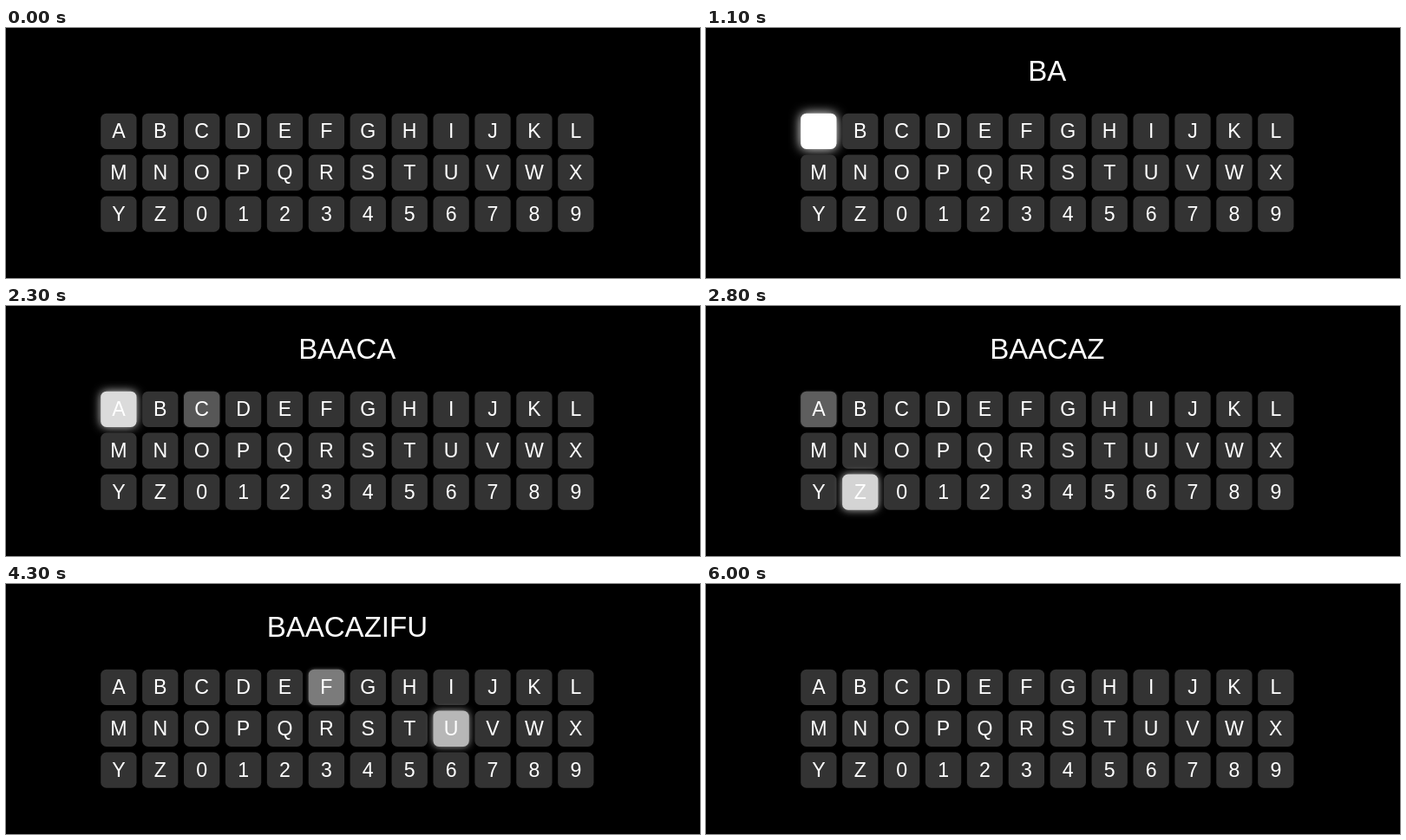
Recreate the animation shown at these times as an HTML page. Size 800x289 px, loop 6.2 s.

```html
<!DOCTYPE html>
<html lang="en">
<head>
<meta charset="utf-8">
<title>Typing keyboard</title>
<style>
  html, body { margin: 0; width: 100%; height: 100%; overflow: hidden; background: #000; }
  #stage {
    position: absolute; left: 0; top: 0; width: 688px;
    transform: translate(109.2px, 32.6px) scale(.826); transform-origin: 0 0;
    font-family: "Liberation Sans", Arial, sans-serif; color: #fff; text-align: center;
  }
  #word { height: 40px; margin-bottom: 40px; font-size: 40px; line-height: 40px; }
  #keys { display: grid; grid-template-columns: repeat(12, 50px); gap: 8px; }
  .key { height: 50px; border-radius: 8px; background: #333; font-size: 28px; line-height: 50px; }
</style>
</head>
<body>
<div id="stage">
  <div id="word"></div>
  <div id="keys"></div>
</div>
<script>
const WORD = "BAACAZIFUZ";
const LOOP = 6200, TICK = 100;
const START = 99, INTERVAL = 511, FADE = 300;
const CLEAR = START + (WORD.length - 1) * INTERVAL + 1000;

const wordBox = document.getElementById("word");
const keys = [..."ABCDEFGHIJKLMNOPQRSTUVWXYZ0123456789"].map(char => {
  const box = document.createElement("div");
  box.className = "key";
  box.textContent = char;
  document.getElementById("keys").append(box);
  return { char, box };
});

// CSS "ease": cubic-bezier(.25, .1, .25, 1), solved by bisection.
function ease(x) {
  if (x <= 0) return 0;
  if (x >= 1) return 1;
  const bezier = (a, b, s) => 3 * a * s * (1 - s) ** 2 + 3 * b * s * s * (1 - s) + s ** 3;
  let low = 0, high = 1;
  for (let i = 0; i < 24; i++) {
    const mid = (low + high) / 2;
    if (bezier(.25, .25, mid) < x) low = mid; else high = mid;
  }
  return bezier(.1, 1, low);
}

function light(box, level) {
  const shade = Math.round(51 + 204 * level);
  box.style.background = `rgb(${shade}, ${shade}, ${shade})`;
  box.style.boxShadow = level ? `0 0 ${15 * level}px rgba(255, 255, 255, ${level})` : "none";
}

function draw(time) {
  const cleared = time >= CLEAR;
  const index = cleared ? WORD.length : Math.min(WORD.length - 1, Math.floor((time - START) / INTERVAL));
  const pressedAt = cleared ? CLEAR : START + index * INTERVAL;
  const blend = ease((time - pressedAt) / FADE);
  const current = WORD[index], previous = WORD[index - 1];

  wordBox.textContent = cleared ? "" : WORD.slice(0, index + 1);
  for (const { char, box } of keys) {
    light(box, (char === current ? blend : 0) + (char === previous ? 1 - blend : 0));
  }
}

// The picture advances in steps of one tick.
function frame() {
  draw(Math.floor(performance.now() % LOOP / TICK) * TICK);
  requestAnimationFrame(frame);
}
frame();
</script>
</body>
</html>
```
